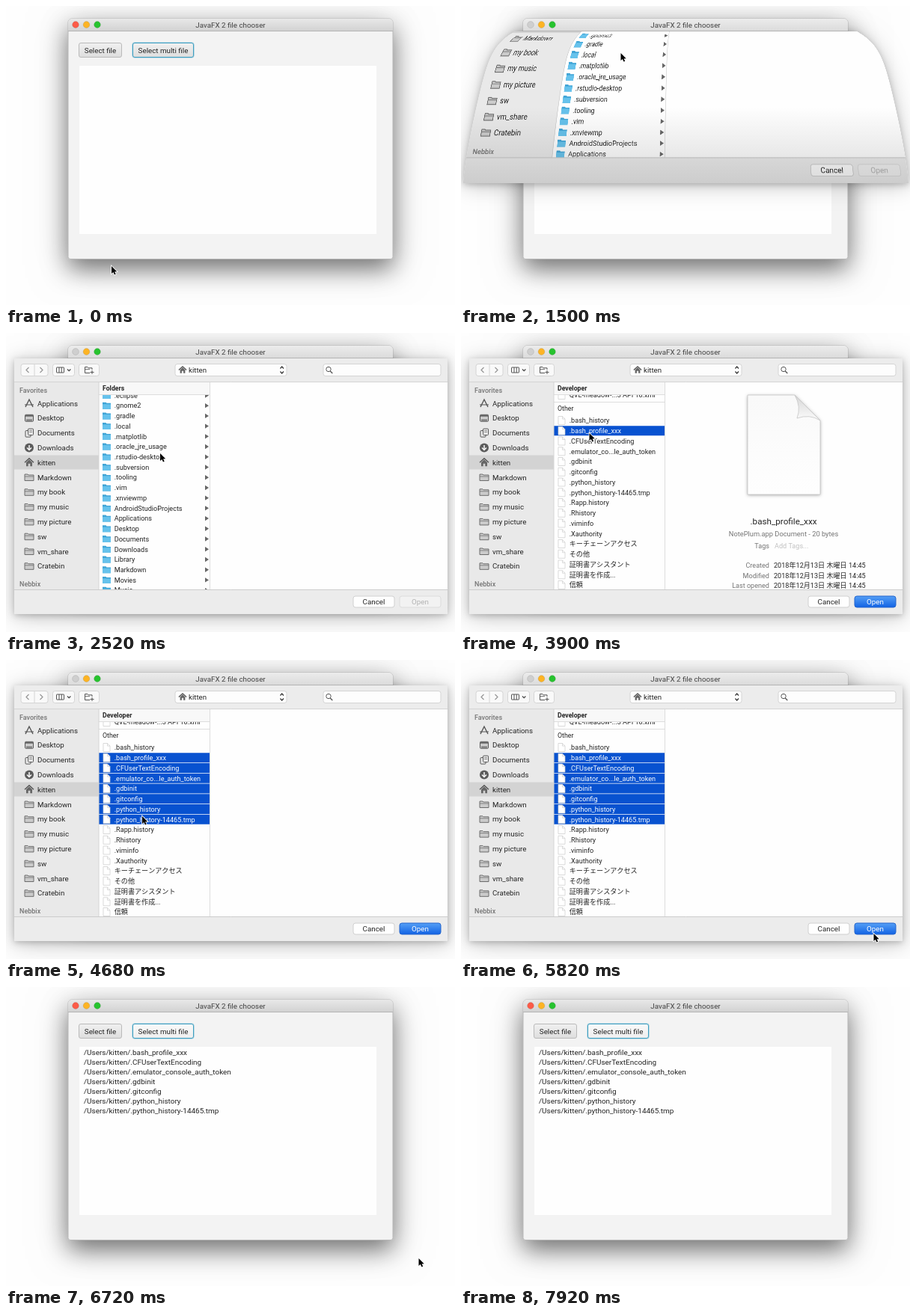
These frames come from a looping animation (600x400 px, 8040 ms). An HTML page with a canvas:

```html
<!DOCTYPE html>
<html lang="en">
<head>
<meta charset="utf-8">
<title>JavaFX 2 file chooser</title>
<style>
html, body { margin: 0; width: 100%; height: 100%; overflow: hidden; background: #fefefe; }
canvas { display: block; width: 600px; height: 400px; }
</style>
</head>
<body>
<canvas id="stage"></canvas>
<script>
const LOOP = 8040, STEP = 60, MID = 300.5, TOP = 34, BOTTOM = 376;
const OPEN = 1198, CLOSE = 5935, FOLD = 540;
const SCROLL = [2160, 3360], PICK = 3780, PICK_MANY = 4560, PRESS = 5860;
const BODY = '#f3f3f3', PANEL = '#ececec', PAPER = '#fefefe', EDGE = '#d4d4d4';
const INK = '#242424', DARK = '#555555', GREY = '#757575', BLUE = '#0852d0';
const FAMILY = 'Roboto, "Noto Sans CJK JP", "Noto Sans CJK", sans-serif';
const USER = 'kitten';

const PLACES = ['Applications', 'Desktop', 'Documents', 'Downloads', USER, 'Markdown',
  'my book', 'my music', 'my picture', 'sw', 'vm_share', 'Cratebin'];
const FOLDERS = ('.android .atom .bash_sessions .cache .config .cratebin .eclipse .gnome2 .gradle ' +
  '.local .matplotlib .oracle_jre_usage .rstudio-desktop .subversion .tooling .vim .xnviewmp ' +
  'AndroidStudioProjects Applications Desktop Documents Downloads Library Markdown Movies Music ' +
  'Pictures Public sw vm_share').split(' ');
const FILES = ['.bash_history', '.bash_profile_xxx', '.CFUserTextEncoding', '.emulator_co...le_auth_token',
  '.gdbinit', '.gitconfig', '.python_history', '.python_history-14465.tmp', '.Rapp.history', '.Rhistory',
  '.viminfo', '.Xauthority', 'キーチェーンアクセス', 'その他', '証明書アシスタント', '証明書を作成...', '信頼'];
const CHOSEN = FILES.slice(1, 8).map(n => n.replace('co...le', 'console'));

// time, x, y of the pointer tip
const PATH = [[360, 141, 348], [1080, 213.5, 63], [1560, 213.5, 63], [1860, 206, 161], [3300, 206, 161],
  [3660, 171.5, 134], [3960, 171.5, 134], [4440, 182, 209], [4740, 182, 209], [5520, 551.5, 366],
  [5880, 551.5, 366], [6120, 551.5, 363]];
const POINTER_END = 7440;

const ROW = 13.72;
const rows = FOLDERS.map((name, i) => ({ kind: 'folder', name, y: 92 + ROW * i }));
const devY = rows[rows.length - 1].y + 18, otherY = devY + 34;
rows.push({ kind: 'title', name: 'Developer', y: devY });
rows.push({ kind: 'file', name: 'QVL-meadow-...3 API 10.xml', y: devY + 16 });
rows.push({ kind: 'title', name: 'Other', y: otherY });
FILES.forEach((name, i) => rows.push({ kind: 'file', name, index: i, y: otherY + 16 + 13.75 * i }));
const MAX_SCROLL = otherY - 101;

const stage = document.getElementById('stage');
const dpr = window.devicePixelRatio || 1, K = 2;
function surface(canvas, scale) {
  canvas.width = 600 * scale;
  canvas.height = 400 * scale;
  const c = canvas.getContext('2d');
  c.scale(scale, scale);
  return c;
}
const main = surface(stage, dpr);
const sheetCanvas = document.createElement('canvas');
const off = surface(sheetCanvas, K);
let g = main;

const clamp = v => Math.max(0, Math.min(1, v));
const ease = v => 0.5 - 0.5 * Math.cos(Math.PI * clamp(v));

function text(s, x, y, size = 9.1, color = INK, align = 'left', weight = 400) {
  g.font = `${weight} ${size}px ${FAMILY}`;
  g.fillStyle = color;
  g.textAlign = align;
  g.fillText(s, x, y + size * 0.36);
}
function box(x, y, w, h, fill, r = 0, stroke) {
  g.beginPath();
  g.roundRect(x, y, w, h, r);
  if (fill) { g.fillStyle = fill; g.fill(); }
  if (stroke) { g.strokeStyle = stroke; g.lineWidth = 1; g.stroke(); }
}
function poly(points, fill, stroke, width = 1, closed = true) {
  g.beginPath();
  points.forEach(([x, y], i) => i ? g.lineTo(x, y) : g.moveTo(x, y));
  if (closed) g.closePath();
  if (fill) { g.fillStyle = fill; g.fill(); }
  if (stroke) { g.strokeStyle = stroke; g.lineWidth = width; g.stroke(); }
}
const line = (points, color = DARK, width = 1) => poly(points, null, color, width, false);
function disc(x, y, r, fill, stroke) {
  g.beginPath();
  g.arc(x, y, r, 0, 7);
  if (fill) { g.fillStyle = fill; g.fill(); }
  if (stroke) { g.strokeStyle = stroke; g.lineWidth = 1; g.stroke(); }
}
function shade(y0, y1, a, b) {
  const grad = g.createLinearGradient(0, y0, 0, y1);
  grad.addColorStop(0, a);
  grad.addColorStop(1, b);
  return grad;
}
function shadowed(draw, alpha, blur, dy) {
  g.save();
  g.shadowColor = `rgba(0,0,0,${alpha})`;
  g.shadowBlur = blur * dpr;
  g.shadowOffsetY = dy * dpr;
  draw();
  g.restore();
}

function house(x, y, k = 1) {
  line([[x - 6 * k, y], [x, y - 5.5 * k], [x + 6 * k, y]], DARK, 1.4);
  poly([[x - 4 * k, y], [x, y - 4 * k], [x + 4 * k, y], [x + 4 * k, y + 5 * k], [x + 1.3 * k, y + 5 * k],
    [x + 1.3 * k, y + 1.5 * k], [x - 1.3 * k, y + 1.5 * k], [x - 1.3 * k, y + 5 * k], [x - 4 * k, y + 5 * k]], '#666666');
}
function folderOutline(x, y) {
  poly([[x - 6, y - 4], [x - 2, y - 4], [x - 1, y - 3], [x + 6, y - 3], [x + 6, y + 4.5], [x - 6, y + 4.5]],
    '#cbcbcb', '#6c6c6c', 1);
  line([[x - 6, y - 1], [x + 6, y - 1]], '#6c6c6c', 0.8);
}
function placeIcon(i, x, y) {
  if (i === 0) {
    line([[x - 5, y + 5], [x, y - 5], [x + 5, y + 5]], DARK, 1.4);
    line([[x - 6, y + 2], [x + 6, y + 2]], DARK, 1.2);
  } else if (i === 1) {
    box(x - 5.5, y - 4.5, 11, 9, '#cbcbcb', 1, DARK);
    box(x - 5, y - 4, 10, 2, '#666666');
    box(x - 4, y + 2, 8, 1.5, '#666666');
  } else if (i === 2) {
    box(x - 5, y - 3, 7, 8.5, PANEL, 1, DARK);
    box(x - 1.5, y - 5.5, 7, 8.5, PANEL, 1, DARK);
    line([[x, y - 3], [x + 4, y - 3]], GREY, 0.8);
    line([[x, y - 1], [x + 4, y - 1]], GREY, 0.8);
  } else if (i === 3) {
    disc(x, y, 6, '#5c5c5c');
    line([[x, y - 3.5], [x, y + 3]], PAPER, 1.5);
    line([[x - 3, y], [x, y + 3], [x + 3, y]], PAPER, 1.4);
  } else if (i === 4) house(x, y);
  else folderOutline(x, y);
}
function folderIcon(x, y) {
  poly([[x, y - 4.5], [x + 4.5, y - 4.5], [x + 5.5, y - 3.3], [x + 11, y - 3.3], [x + 11, y + 4.5], [x, y + 4.5]], '#3fa4d6');
  box(x, y - 2, 11, 6.5, '#66c2ec', 0.6);
}
function fileIcon(x, y) {
  poly([[x, y - 5.5], [x + 5.5, y - 5.5], [x + 9, y - 2], [x + 9, y + 5.5], [x, y + 5.5]], '#ffffff', '#cccccc', 0.7);
  line([[x + 5.5, y - 5.5], [x + 5.5, y - 2], [x + 9, y - 2]], '#cccccc', 0.7);
}

function toolbar() {
  box(20, 41.5, 36, 16, '#f9f9f9', 3, EDGE);
  line([[38, 42], [38, 57]], EDGE);
  line([[30.5, 46], [27, 49.5], [30.5, 53]], '#959595', 1.2);
  line([[45.5, 46], [49, 49.5], [45.5, 53]], '#959595', 1.2);
  box(62.5, 41.5, 29, 16, '#f9f9f9', 3, EDGE);
  box(67.5, 46, 10, 7, null, 0.5, DARK);
  line([[71, 46], [71, 53]]);
  line([[74.3, 46], [74.3, 53]]);
  line([[82, 48.5], [84.2, 50.7], [86.4, 48.5]], '#444444', 1.2);
  box(97.5, 41.5, 27, 16, '#f9f9f9', 3, EDGE);
  line([[112, 53.5], [105.5, 53.5], [105.5, 45.5], [109, 45.5], [110, 46.8], [115, 46.8], [115, 49]]);
  line([[105.5, 48.5], [112, 48.5]], DARK, 0.8);
  line([[115, 50], [115, 55]]);
  line([[112.5, 52.5], [117.5, 52.5]]);
  box(226, 41.5, 149, 16, '#fdfdfd', 3, EDGE);
  house(236, 49.5, 0.85);
  text(USER, 244, 49.5, 9.7);
  line([[366.5, 47.5], [368.7, 45], [371, 47.5]], '#333333', 1.2);
  line([[366.5, 51.5], [368.7, 54], [371, 51.5]], '#333333', 1.2);
  box(424, 41.5, 157, 16, '#fdfdfd', 3, EDGE);
  disc(431, 48.5, 3.2, null, DARK);
  line([[433.3, 51], [436.3, 54]], DARK, 1.3);
}

function sidebar() {
  box(11, 66, 113, 277, '#e9e9e9');
  text('Favorites', 18, 77, 9, GREY, 'left', 500);
  box(11, 163.5, 113, 19, '#d3d3d3');
  PLACES.forEach((name, i) => {
    const y = 94 + 19.8 * i;
    placeIcon(i, 31, y);
    text(name, 42, y, 9.75);
  });
  text('Nebbix', 18, 336, 9, GREY, 'left', 500);
}

function column(scroll, first, last) {
  g.save();
  g.beginPath();
  g.rect(124, 66, 149, 277);
  g.clip();
  box(124, 66, 149, 277, PAPER);
  for (const r of rows) {
    const y = r.y - scroll;
    if (y < 66 || y > 355) continue;
    if (r.kind === 'title') {
      line([[124, y - 8.5], [272, y - 8.5]], '#dddddd');
      text(r.name, 129, y, 8.8);
      continue;
    }
    const on = r.index >= first && r.index <= last;
    if (on) box(124, y - 6.4, 148, 12.9, BLUE);
    if (r.kind === 'folder') {
      folderIcon(129, y);
      poly([[266, y - 3.2], [271, y], [266, y + 3.2]], '#666666');
    } else fileIcon(130, y);
    text(r.name, 144.7, y, 9.1, on ? '#ffffff' : INK);
  }
  box(124, 66, 149, 17, '#f8f8f8');
  line([[124, 82.5], [272, 82.5]], '#dddddd');
  text(devY - scroll <= 76 ? 'Developer' : 'Folders', 129, 74, 8.7, INK, 'left', 700);
  g.restore();
  line([[124, 66], [124, 343]], EDGE);
  line([[272.5, 66], [272.5, 343]], '#dddddd');
}

function preview() {
  g.save();
  g.beginPath();
  g.rect(273, 66, 317, 277);
  g.clip();
  const page = [[383, 83], [446, 83], [480, 117], [480, 216], [383, 216]];
  shadowed(() => poly(page, '#fbfbfb'), 0.35, 4, 1);
  poly(page, shade(83, 216, '#f9f9f9', '#fefefe'), '#c6c6c6', 0.8);
  g.beginPath();
  g.moveTo(446, 83);
  g.quadraticCurveTo(455, 99, 449, 114);
  g.quadraticCurveTo(466, 108, 480, 117);
  g.closePath();
  g.fillStyle = shade(83, 117, '#d6d6d6', '#fcfcfc');
  g.fill();
  g.strokeStyle = '#c6c6c6';
  g.lineWidth = 0.8;
  g.stroke();
  text(FILES[1], 431, 252, 11.7, INK, 'center');
  text('NotePlum.app Document - 20 bytes', 431, 268.5, 9.3, GREY, 'center');
  text('Tags', 412, 285, 9.1, GREY, 'right');
  text('Add Tags...', 419, 285, 9.1, '#c2c2c2');
  ['Created', 'Modified', 'Last opened'].forEach((s, i) => {
    const y = 310.5 + 13.8 * i;
    text(s, 412, y, 9.1, GREY, 'right');
    text('2018年12月13日 木曜日 14:45', 418, y, 9.1);
  });
  g.restore();
}

function footer(t) {
  line([[11, 343.5], [590, 343.5]], '#cccccc');
  box(464, 352, 55, 15, '#fefefe', 3, '#d0d0d0');
  text('Cancel', 491.5, 359.5, 9.8, INK, 'center');
  const on = t >= PICK, down = t >= PRESS;
  const blue = down ? shade(352, 367, '#1f66e0', '#0647cc') : shade(352, 367, '#559ff6', '#1263e4');
  box(526, 352, 55, 15, on ? blue : '#f2f2f2', 3, on ? '#2465cc' : '#dcdcdc');
  text('Open', 553.5, 359.5, 9.8, on ? '#ffffff' : '#b2b2b2', 'center');
}

function sheetFace(t) {
  g.save();
  g.beginPath();
  g.roundRect(11, TOP, 579, BOTTOM - TOP, [0, 0, 4, 4]);
  g.clip();
  box(11, TOP, 579, BOTTOM - TOP, PANEL);
  box(273, 66, 317, 277, PAPER);
  line([[11, 65.5], [590, 65.5]], EDGE);
  toolbar();
  sidebar();
  const scroll = MAX_SCROLL * ease((t - SCROLL[0]) / (SCROLL[1] - SCROLL[0]));
  column(scroll, t >= PICK ? 1 : 99, t >= PICK_MANY ? 7 : 1);
  if (t >= PICK && t < PICK_MANY) preview();
  footer(t);
  g.restore();
}

function sheet(t, p) {
  const h = Math.round((BOTTOM - TOP) * p), low = TOP + h;
  if (h < 2) return;
  const bend = Math.min(1, 2.44 * (1 - p));
  const width = y => {
    const u = clamp((low - y) / h);
    return 1 + bend * (0.028 - 0.15 * u ** 1.3 - 0.09 * u ** 12);
  };
  // distance above the lower edge on the flat sheet, for a distance on the stage
  const depth = d => {
    const u = d / h;
    return d * (1 - bend * (0.04 + 0.035 * u)) + 9 * bend * u ** 20;
  };
  const edge = side => Array.from({ length: 41 }, (_, i) => {
    const y = TOP + h * i / 40;
    return [MID + side * 289.5 * width(y), y];
  });
  const outline = edge(-1).concat(edge(1).reverse());
  shadowed(() => poly(outline, PANEL), 0.22, 28, 4);
  shadowed(() => poly(outline, PANEL), 0.22, 8, 2);
  if (p === 1) return sheetFace(t);

  g = off;
  g.clearRect(0, 0, 600, 400);
  sheetFace(t);
  g = main;
  for (let y = TOP; y < low; y++) {
    const a = BOTTOM - depth(low - y), b = BOTTOM - depth(low - y - 1), s = width(y + 0.5);
    g.drawImage(sheetCanvas, 0, a * K, 600 * K, (b - a) * K, MID - MID * s, y, 600 * s, 1);
  }
  poly(outline, shade(TOP + h * 0.5, low, 'rgba(50,50,50,0)', `rgba(50,50,50,${0.17 * bend})`));
}

function button(x, w, label, focus, hover) {
  box(x + 0.5, 49.5, w - 1, 19, hover ? shade(49, 69, '#fafafa', '#eeeeee') : shade(49, 69, '#f1f1f1', '#dddddd'),
    2.5, focus ? '#3d9fc0' : '#bababa');
  if (focus) box(x - 0.2, 48.8, w + 0.4, 20.4, null, 3, 'rgba(61,159,192,.4)');
  text(label, x + w / 2, 59, 9.8, INK, 'center');
}

function windowBody(t) {
  const shape = () => box(83, 17, 434, 321.5, BODY, [5, 5, 3, 3]);
  shadowed(shape, 0.14, 52, 8);
  shadowed(shape, 0.5, 32, 13);
  box(83, 17, 434, 321.5, BODY, [5, 5, 3, 3], '#b8b8b8');
  button(97, 58, 'Select file', false, false);
  button(169, 82, 'Select multi file', true, t >= 1020);
  box(98, 80, 397, 225, PAPER);
  if (t >= CLOSE + FOLD) CHOSEN.forEach((n, i) => text(`/Users/${USER}/${n}`, 104, 87.3 + 12.95 * i, 9.95));
}

function titleBar(busy) {
  box(83, 17, 434, 17, busy ? shade(17, 34, '#ececec', '#dadada') : shade(17, 34, '#e8e8e8', '#d1d1d1'), [5, 5, 0, 0]);
  line([[83, 33.5], [517, 33.5]], '#b4b4b4');
  [[93, busy ? '#cfcfcf' : '#fc5b48'], [107.5, '#fdb424'], [122, '#27c32f']]
    .forEach(([x, color]) => disc(x, 25, 4.4, color, 'rgba(80,80,80,.15)'));
  text('JavaFX 2 file chooser', 300, 25.3, 9.8, '#424242', 'center');
}

function pointer(t) {
  if (t >= POINTER_END) return;
  let [, x, y] = PATH[0];
  for (let i = 1; i < PATH.length && t > PATH[i - 1][0]; i++) {
    const [t0, x0, y0] = PATH[i - 1], [t1, x1, y1] = PATH[i];
    const k = ease((t - t0) / (t1 - t0));
    x = x0 + (x1 - x0) * k;
    y = y0 + (y1 - y0) * k;
  }
  const tip = [[0, 0], [0, 10], [2.3, 8], [4, 11.6], [5.7, 10.8], [4.1, 7.4], [7.2, 7.2]];
  const pts = tip.map(([a, b]) => [x + a, y + b]);
  poly(pts, null, '#ffffff', 1.6);
  poly(pts, '#000000');
}

function draw(t) {
  g = main;
  box(0, 0, 600, 400, '#fefefe');
  const p = t < CLOSE ? ease((t - OPEN) / FOLD) : 1 - ease((t - CLOSE) / FOLD);
  windowBody(t);
  if (p > 0) sheet(t, p);
  titleBar(p > 0);
  pointer(t);
}

const start = performance.now();
function tick() {
  const t = (performance.now() - start) % LOOP;
  draw(Math.floor(t / STEP) * STEP);
  requestAnimationFrame(tick);
}
tick();
</script>
</body>
</html>
```
